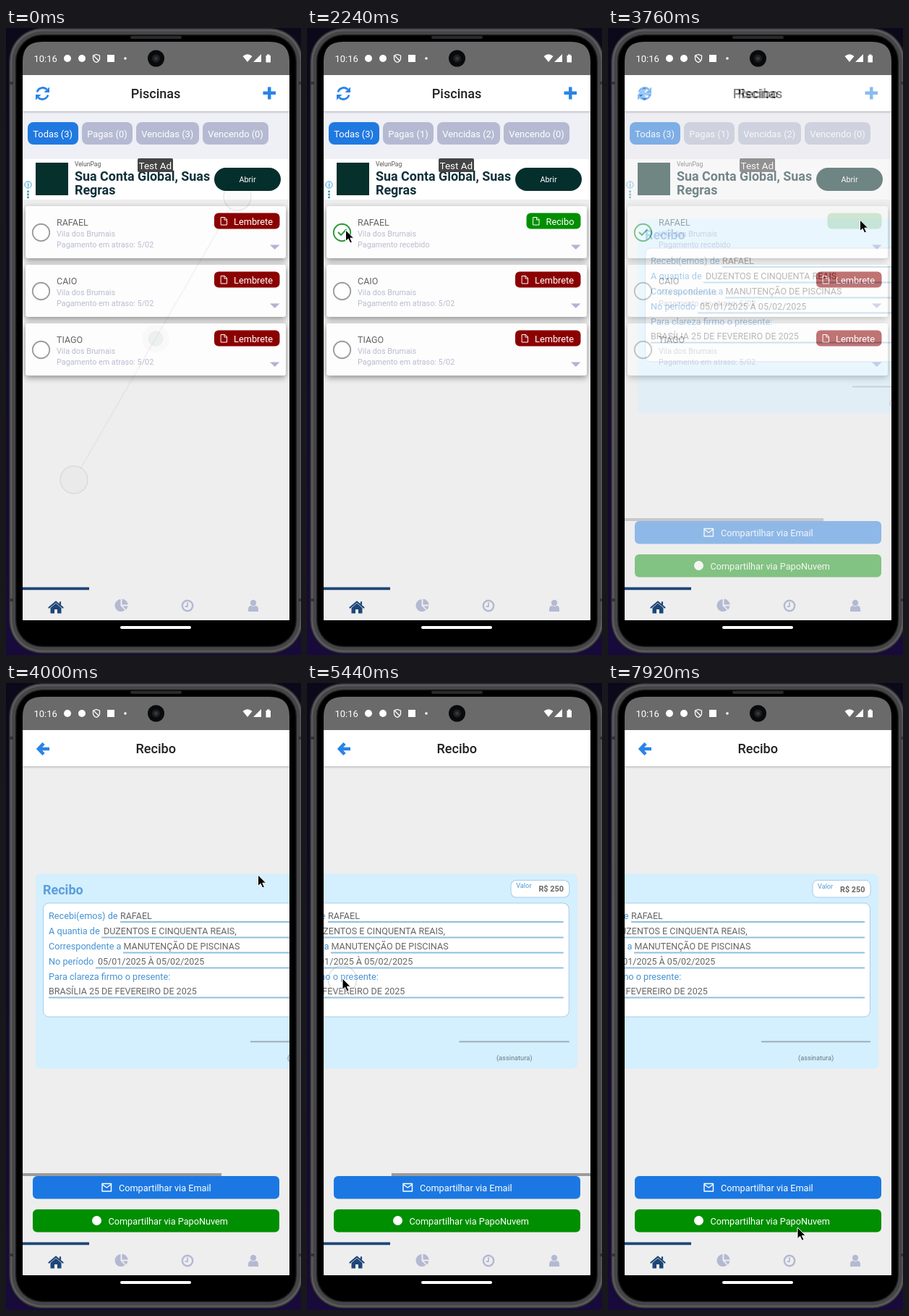
Recreate the animation shown at these times as an HTML page. Size 408x866 px, loop 8 s.

```html
<!DOCTYPE html>
<html lang="pt-BR">
<head>
<meta charset="utf-8">
<title>Recibos</title>
<style>
html, body { margin: 0; width: 100%; height: 100%; overflow: hidden; background: linear-gradient(#0b0919, #180a3a); }
svg { display: block; width: 408px; height: 866px; font-family: Roboto, Arial, sans-serif; }
.card { fill: #fdfdfd; filter: drop-shadow(0 3px 4px #0006); }
.bar { fill: #fff; filter: drop-shadow(0 1px 1.5px #0004); }
.line { fill: none; stroke-linecap: round; stroke-linejoin: round; }
</style>
</head>
<body>
<svg id="stage" viewBox="0 0 408 866"></svg>
<script>
const LOOP = 8000, MAX_SCROLL = 126;
const BLUE = '#2a84e6', NAVY = '#1d4677', MUTED = '#b4b9d3', RED = '#8b0000', GREEN = '#008f00';

const rect = (x, y, w, h, fill, r = 0, more = '') =>
  `<rect x="${x}" y="${y}" width="${w}" height="${h}" rx="${r}" fill="${fill}" ${more}/>`;
const disc = (x, y, r, fill, more = '') =>
  `<circle cx="${x}" cy="${y}" r="${r}" fill="${fill}" ${more}/>`;
const text = (x, y, size, fill, str, weight = 400, more = '') =>
  `<text x="${x}" y="${y}" font-size="${size}" fill="${fill}" font-weight="${weight}" ${more}>${str}</text>`;
const shape = (d, fill, more = '') => `<path d="${d}" fill="${fill}" ${more}/>`;
const line = (d, color, w, more = '') =>
  `<path class="line" d="${d}" stroke="${color}" stroke-width="${w}" ${more}/>`;
const group = (id, body, more = '') => `<g id="${id}" ${more}>${body}</g>`;

// rounded shell reaching d pixels beyond the display
const shell = (d, fill) => rect(23 - d, 19 - d, 369 + 2 * d, 826 + 2 * d, fill, 27 + d);

const phone = () =>
  shell(19, '#29292b') + shell(17.5, '#59595b') + shell(14.5, '#454547') +
  [74, 788].map(y => rect(5, y, 5, 4, '#333335') + rect(405, y, 5, 4, '#333335')).join('') +
  shell(10, '#1b1b1c') + shell(8.5, '#000') +
  rect(172, 11, 71, 4, '#2a2a2c', 2) +
  shape('M23 65V46Q23 19 50 19H365Q392 19 392 46V65Z', '#6a6a6a') +
  rect(23, 65, 369, 753, '#eeeeee') +
  rect(158, 826, 98, 4, '#fff', 2);

const statusBar = () =>
  text(38.5, 46.5, 13, '#fff', '10:16') +
  disc(85, 42, 5, '#fff') + disc(105, 42, 5, '#fff') +
  line('M125 36.5L129.5 38.2V42Q129.5 45.5 125 47.5Q120.5 45.5 120.5 42V38.2ZM122 39L128 45', '#fff', 1.3) +
  rect(140, 37, 10, 10, '#fff') + disc(165, 42, 1.8, '#fff') +
  shape('M327.5 39Q334 33.5 340.5 39L334 47ZM353 36V47H342ZM359.5 38H361V36.5H364.5V38H366V47.5H359.5Z', '#fff') +
  disc(207.5, 42, 11.5, '#0a0a0b') + disc(207.5, 42, 5.5, '#1d2023') + disc(207.5, 42, 2.5, '#34383c');

const tabBar = () =>
  rect(23, 772.4, 92, 3.8, NAVY) +
  shape('M69 794.5L76.5 801V808.5H71V803H67V808.5H61.5V801Z', NAVY) +
  line('M59.5 800.5L69 792.5L78.5 800.5M75 793V796', NAVY, 2.2) +
  shape('M158.5 789V798L164.5 804A8.5 8.5 0 1 1 158.5 789Z', MUTED) +
  shape('M160.5 788.5A8.5 8.5 0 0 1 168.5 796.5H160.5ZM161.5 798.5H168.5Q168 801.5 166 803.5Z', MUTED) +
  disc(251, 798, 7.2, 'none', `stroke="${MUTED}" stroke-width="2.4"`) +
  line('M251 794V799H248.5', MUTED, 1.8) +
  disc(342, 794, 4.2, MUTED) +
  shape('M335 806V803Q335 798 339 798Q342 800 345 798Q349 798 349 803V806Z', MUTED);

const chip = (x, w, label, id, fill = '#b5bad2') =>
  rect(x, 130, w, 31, fill, 8) + text(x + 7.3, 151, 12.9, '#fff', label, 400, `id="${id}"`);

const badge = (x, y, label, fill, id) => group(id,
  rect(x, y, 378.5 - x, 22, fill, 6) + group(id + 'Ink',
    line(`M${x + 9.5} ${y + 6}h5l3 3v7.5h-8zM${x + 14} ${y + 6}v3.5h3.5`, '#fff', 1) +
    text(x + 27, y + 16, 12.8, '#fff', label)));

const client = (name, i) => {
  const y = 246 + 81 * i;
  return rect(27, y, 360, 72, '#fff', 3, 'class="card"') +
    disc(48.5, y + 36.5, 11.7, '#fff', `id="ring${i}" stroke="#9c9c9c" stroke-width="1.9"`) +
    text(70, y + 27, 12.5, '#666', name) +
    text(70, y + 42.3, 10.8, '#b9bccf', 'Vila dos Brumais') +
    text(70, y + 57.3, 10.8, '#b9bccf', 'Pagamento em atraso: 5/02', 400, `id="note${i}"`) +
    shape(`M365 ${y + 53.5}h13.5l-6.75 6.5z`, '#b1b4d3') +
    badge(288, y + 9.5, 'Lembrete', RED, 'due' + i);
};

const banner = () =>
  rect(23, 181, 369, 56, '#fff') + rect(41, 186, 45, 45, '#06302c') +
  text(95, 191, 8.6, '#555', 'VelunPag') +
  text(95, 211, 17.9, '#10303a', 'Sua Conta Global, Suas', 700) +
  text(95, 230, 17.9, '#10303a', 'Regras', 700) +
  rect(288, 193, 92, 32, '#042f2d', 16) + text(322.5, 212.7, 10.8, '#fff', 'Abrir') +
  disc(30.5, 216.5, 4.6, '#fff', 'stroke="#35a0cc"') + rect(30, 215, 1.2, 4.5, '#35a0cc') +
  rect(30, 213.2, 1.2, 1.2, '#35a0cc') +
  [226, 230, 234].map(y => disc(30.5, y, 1.4, '#2f8fc0')).join('') +
  rect(182, 180, 49, 19, '#444', 2) + text(183.5, 194.5, 13.5, '#fff', 'Test Ad');

const home = () => rect(23, 115, 369, 66, '#efeff6') +
  rect(23, 65, 369, 50, '#fff', 0, 'class="bar"') +
  text(172.8, 97, 18, '#222', 'Piscinas', 500) +
  line('M43 88.5A8 8 0 0 1 56.5 85M58 92.5A8 8 0 0 1 44.5 96', BLUE, 2.8, 'style="stroke-linecap:butt"') +
  shape('M60 81.5V89H52.5ZM41 99.5V92H48.5Z', BLUE) +
  shape('M362 81.5h4.5v6h6.5v4.5h-6.5v6.5h-4.5v-6.5h-6.5v-4.5h6.5z', BLUE) +
  chip(30, 70, 'Todas (3)', 'all', '#2079e0') + chip(105, 70, 'Pagas (0)', 'paid') +
  chip(180, 87, 'Vencidas (3)', 'late') + chip(272, 91, 'Vencendo (0)', 'soon') +
  banner() + ['RAFAEL', 'CAIO', 'TIAGO'].map(client).join('') +
  badge(303.5, 255.5, 'Recibo', GREEN, 'receiptBtn') +
  line('M43.5 282.5L47 286L54 278.5', '#2a9a35', 1.9, 'id="tick"');

// label, baseline, value, value x, underline start, underline y
const FIELDS = [
  ['Recebi(emos) de', 326, 'RAFAEL', 158, 158, 330],
  ['A quantia de', 347, 'DUZENTOS E CINQUENTA REAIS,', 135, 132, 351.5],
  ['Correspondente a', 368, 'MANUTENÇÃO DE PISCINAS', 162.5, 162, 372.5],
  ['No período', 389, '05/01/2025 À 05/02/2025', 127, 124, 393.5],
  ['Para clareza firmo o presente:', 410, '', 0, 0, 0],
  ['', 430, 'BRASÍLIA 25 DE FEVEREIRO DE 2025', 59, 59, 434.5]
];

const slip = () => rect(41, 263.5, 459, 269, '#d4effe', 6) +
  text(51, 291.5, 18, '#5b9edc', 'Recibo', 700) +
  rect(409, 272.5, 80, 23.5, '#fff', 7, 'stroke="#a9cdea"') +
  text(416, 283.5, 9.2, '#4c98d6', 'Valor') + text(447, 288.5, 10.8, '#666', 'R$ 250', 700) +
  rect(51.5, 304, 437, 157, '#fff', 8, 'stroke="#a9cdea"') +
  FIELDS.map(([label, y, value, x, from, under]) =>
    text(59, y, 12.7, '#4592d3', label) + text(x, y, 12.5, '#666', value) +
    (under ? rect(from, under - 1, 481 - from, 2, '#8fc0e0') : '')).join('') +
  rect(338, 494.5, 151, 1.8, '#98a8b4') + text(389, 521, 9.2, '#6c7885', '(assinatura)');

const receipt = () => rect(23, 65, 369, 706, '#eeeeee') +
  rect(23, 65, 369, 50, '#fff', 0, 'class="bar"') +
  text(179.5, 97, 18.1, '#222', 'Recibo', 500) +
  line('M52 83.5L45 91L52 98.5M46 91H60', BLUE, 4.6, 'style="stroke-linecap:butt;stroke-linejoin:miter"') +
  group('slip', slip()) + rect(23, 677, 275, 4, '#9b9b9b', 0, 'id="thumb"') +
  rect(37, 681, 341, 31.5, '#1b78e2', 6) +
  line('M133 691.5h12.5v10.5h-12.5zM133 692.5l6.25 4.5l6.25-4.5', '#fff', 1.4) +
  text(156, 701.5, 12.7, '#fff', 'Compartilhar via Email') +
  rect(37, 727, 341, 31.5, GREEN, 6) + disc(125.5, 742.5, 6.5, '#fff') +
  text(141.5, 748, 12.7, '#fff', 'Compartilhar via PapoNuvem');

const pinch = () =>
  line('M310 250L104 607', '#000', 2, 'opacity=".04"') +
  [[320, 233], [94, 624]].map(([x, y]) =>
    disc(x, y, 19, '#00000004', 'stroke="#00000014" stroke-width="1.5"')).join('') +
  disc(207, 429, 19, '#00000004') + disc(207, 429, 10, '#5a8a7814', 'stroke="#0000000a"');

const stage = document.getElementById('stage');
stage.innerHTML = `<clipPath id="screen"><rect x="23" y="65" width="369" height="753"/></clipPath>` +
  phone() + statusBar() +
  `<g clip-path="url(#screen)">${group('home', home())}${group('receipt', receipt())}${tabBar()}</g>` +
  group('pinch', pinch()) +
  group('touch', disc(0, 0, 19.5, '#ffffff20', 'stroke="#a0a0a0" stroke-opacity=".38" stroke-width="1.8"')) +
  group('cursor', shape('M0 0V15.5L3.6 12.2L6.2 18L8.9 16.8L6.3 11.2H11.2Z', '#000', 'stroke="#fff" stroke-width="1"'));

const el = id => document.getElementById(id);
const clamp = (v, a = 0, b = 1) => Math.min(b, Math.max(a, v));
const ramp = (t, a, b) => clamp((t - a) / (b - a));
const ease = p => p * p * (3 - 2 * p);
const show = (id, alpha) => el(id).setAttribute('opacity', alpha);
const move = (id, tf) => el(id).setAttribute('transform', tf);

// time, x, y of the pointer
const PATH = [
  [0, 160, 420], [900, 160, 420], [1680, 53.5, 279], [2280, 53.5, 279], [3040, 348.5, 265],
  [4240, 348.5, 265], [4640, 330, 402], [4720, 330, 402], [5280, 49, 408], [5520, 49, 408],
  [6080, 205, 535], [6440, 285, 555], [6720, 314, 526], [6900, 314, 526],
  [7720, 258, 727], [7880, 262, 752], [8000, 262, 752]
];

function pointer(t) {
  const i = PATH.findIndex(k => k[0] > t);
  const [t0, x0, y0] = PATH[i - 1], [t1, x1, y1] = PATH[i];
  const p = ease(ramp(t, t0, t1));
  return [x0 + (x1 - x0) * p, y0 + (y1 - y0) * p];
}

const press = (t, a, b, fade = 120) => ramp(t, a - 60, a) * (1 - ramp(t, b, b + fade));

function draw(t) {
  const [x, y] = pointer(t);
  show('pinch', 1 - ramp(t, 40, 320));
  show('cursor', t >= 960 ? 1 : 0);
  move('cursor', `translate(${x} ${y})`);
  move('touch', `translate(${x} ${y + 2})`);
  show('touch', Math.max(press(t, 1800, 1920), press(t, 3440, 3620), press(t, 4720, 5400, 160)));

  const paid = t >= 1920;
  el('paid').textContent = `Pagas (${+paid})`;
  el('late').textContent = `Vencidas (${3 - paid})`;
  el('note0').textContent = paid ? 'Pagamento recebido' : 'Pagamento em atraso: 5/02';
  el('ring0').setAttribute('stroke', paid ? '#2a9a35' : '#9c9c9c');
  show('due0', +!paid);
  show('tick', +paid);
  const held = ramp(t, 3420, 3560);
  show('receiptBtn', paid ? 1 - .73 * held : 0);
  show('receiptBtnInk', 1 - held);

  show('receipt', ramp(t, 3680, 3860));
  const drag = t < 4720 ? 0 : t < 5280 ? 330 - x : 281;
  const scroll = clamp(drag, 0, MAX_SCROLL);
  const pull = .0085 * clamp((drag - MAX_SCROLL) / 155) * (1 - ease(ramp(t, 5460, 5760)));
  move('slip', `translate(392 0) scale(${1 + pull} 1) translate(${-392 - scroll} 0)`);
  move('thumb', `translate(${scroll * 369 / 495} 0)`);
  show('thumb', 1 - ramp(t, 5720, 5960));
}

const start = performance.now();
function tick() {
  draw(Math.max(0, performance.now() - start) % LOOP);
  requestAnimationFrame(tick);
}
tick();
</script>
</body>
</html>
```
